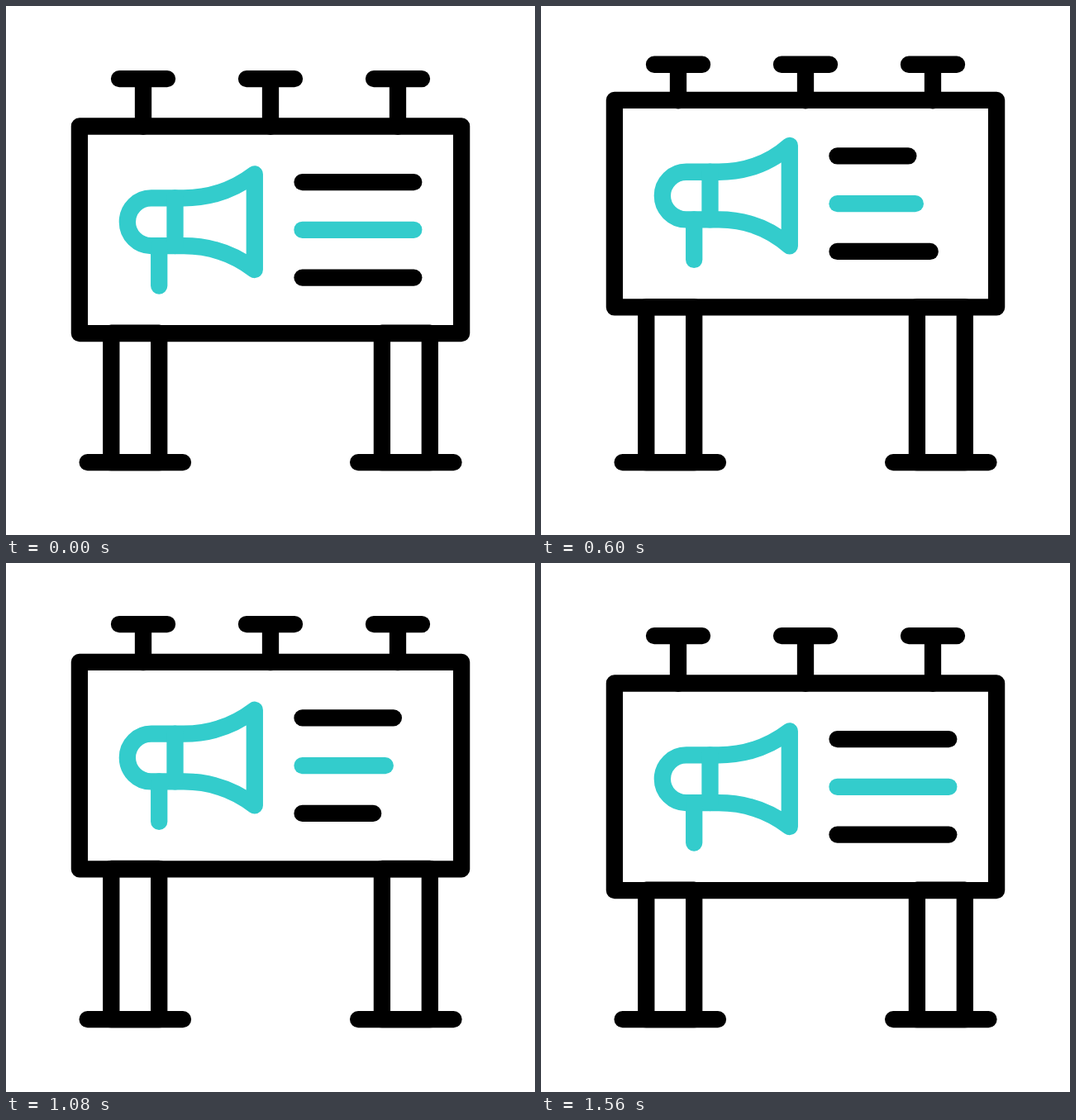
An HTML page that plays this animation: 640x640 px, repeating every 1640 ms.

```html
<!DOCTYPE html>
<html lang="en">
<head>
<meta charset="utf-8">
<title>Billboard</title>
<style>
  html, body { margin: 0; width: 100%; height: 100%; overflow: hidden; background: #fff; }
  svg { display: block; width: 100%; height: 100%; }
  path { fill: none; stroke: #000; stroke-width: 20.3; stroke-linecap: round; stroke-linejoin: round; }
  .accent { stroke: #33cccc; }
</style>
</head>
<body>
<svg viewBox="0 0 640 640">
  <path d="M98.6 552.1H214M426.1 552.1H541.5"/>
  <path id="legs"/>
  <path id="lamps"/>
  <g id="board">
    <path d="M88.9 145.5H551.1V396.1H88.9Z"/>
    <path class="accent" id="horn"/>
    <path class="accent" d="M204.5 232.4V290.1M185.2 290.1V338.6"/>
    <path class="bar"/>
    <path class="bar accent"/>
    <path class="bar"/>
  </g>
</svg>
<script>
const LOOP = 1640, STEP = 40;
const LIFT = 35.4, LAMP_LIFT = 19.4, FLARE = 5.6, SHRINK = 52.5;

// Each pulse: rise start, rise end, fall start, fall end (ms)
const BOARD = [147, 715, 880, 1460];
const HORN = [220, 480, 480, 730];
const BARS = [
  { y: 213.1, pulse: [133, 688, 836, 1303] },
  { y: 270.8, pulse: [273, 747, 879, 1390] },
  { y: 328.6, pulse: [347, 905, 995, 1545] }
];

const $ = id => document.getElementById(id);
const legs = $('legs'), lamps = $('lamps'), board = $('board'), horn = $('horn');
const bars = document.querySelectorAll('.bar');
const draw = (el, d) => el.setAttribute('d', d);

function ease(t, from, to) {
  const x = Math.min(1, Math.max(0, (t - from) / (to - from)));
  return x * x * (3 - 2 * x);
}
const pulse = (t, [a, b, c, d]) => ease(t, a, b) - ease(t, c, d);

function render(t) {
  const p = pulse(t, BOARD);
  const lift = p * LIFT, lampY = 88.1 - p * LAMP_LIFT;
  board.setAttribute('transform', `translate(0 ${-lift})`);

  draw(lamps, [166, 320, 474].map(x =>
    `M${x - 29} ${lampY}h58M${x} ${lampY}V${145.9 - lift}`).join(''));
  draw(legs, [127.3, 454.9].map(x =>
    `M${x} ${395.7 - lift}h57.9V552.2h-57.9Z`).join(''));

  const f = pulse(t, HORN) * FLARE;
  draw(horn, `M175.7 232.4H215C247 232.4 277 221.5 300.8 ${203.4 - f}` +
    `V${319.1 + f}C277 301 247 290.1 215 290.1H175.7a28.85 28.85 0 0 1 0 -57.7Z`);

  BARS.forEach((b, i) =>
    draw(bars[i], `M358.5 ${b.y}H${493.3 - pulse(t, b.pulse) * SHRINK}`));
}

const start = performance.now();
function tick() {
  const t = (performance.now() - start) % LOOP;
  render(Math.floor(t / STEP) * STEP);
  requestAnimationFrame(tick);
}
tick();
</script>
</body>
</html>
```
